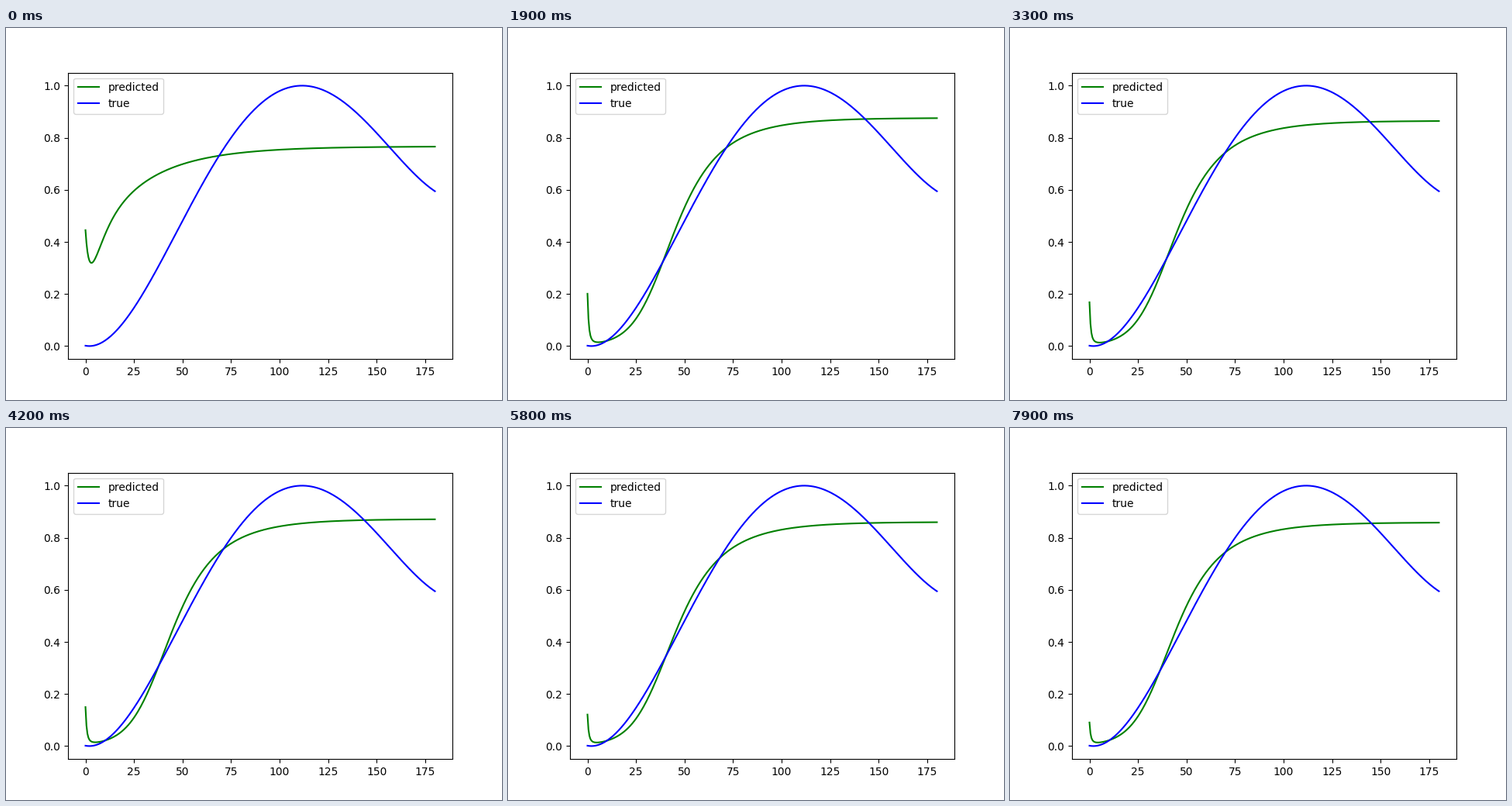
A matplotlib script for the animation above (8 s loop, 640 by 480 pixels).

```python
import numpy as np
import matplotlib.pyplot as plt
from matplotlib.animation import FuncAnimation

FRAMES, STEP = 80, 100

x = np.linspace(0, 180, 361)


def sigmoid(v):
    return 1 / (1 + np.exp(-v))


def true_curve():
    """Quartic given by its turning points, scaled to 0..1."""
    y = np.polyval(np.polyint(np.poly([2, 111.6, 192])), x)
    return (y - y.min()) / (y.max() - y.min())


def untrained():
    dip = 1.558 * np.exp(-x / 2.125) - 1.218 * np.exp(-x / 6)
    return 1.19 - 1.75 * np.exp(-x / 31) + dip


def trained(i):
    """Logits of the fit: a slow drift with an oscillating step."""
    plateau = 1.95 - 0.0014 * i + 0.05 * np.cos(0.263 * (i - 70))
    width = 22.72 + 1.4 * np.cos(1.372 * (i - 50))
    depth = 11.2 - 0.009 * i
    start = -1.09 - 0.0154 * i
    decay = 2.13 - 0.0067 * i
    base = plateau - depth * sigmoid((13 - x) / width)
    return base + (start - base[0]) * np.exp(-x / decay)


def predicted(i):
    k = np.exp(-i / 3)
    return sigmoid(k * untrained() + (1 - k) * trained(i))


fig, ax = plt.subplots(figsize=(6.4, 4.8), dpi=100)
line, = ax.plot(x, predicted(0), color="green", label="predicted")
ax.plot(x, true_curve(), color="blue", label="true")
ax.set_xlim(-9, 189)
ax.set_ylim(-0.05, 1.05)
ax.legend(loc="upper left")


def update(i):
    line.set_ydata(predicted(i))
    return line,


anim = FuncAnimation(fig, update, frames=FRAMES, interval=STEP,
                     repeat=True, repeat_delay=0)
plt.show()
```
